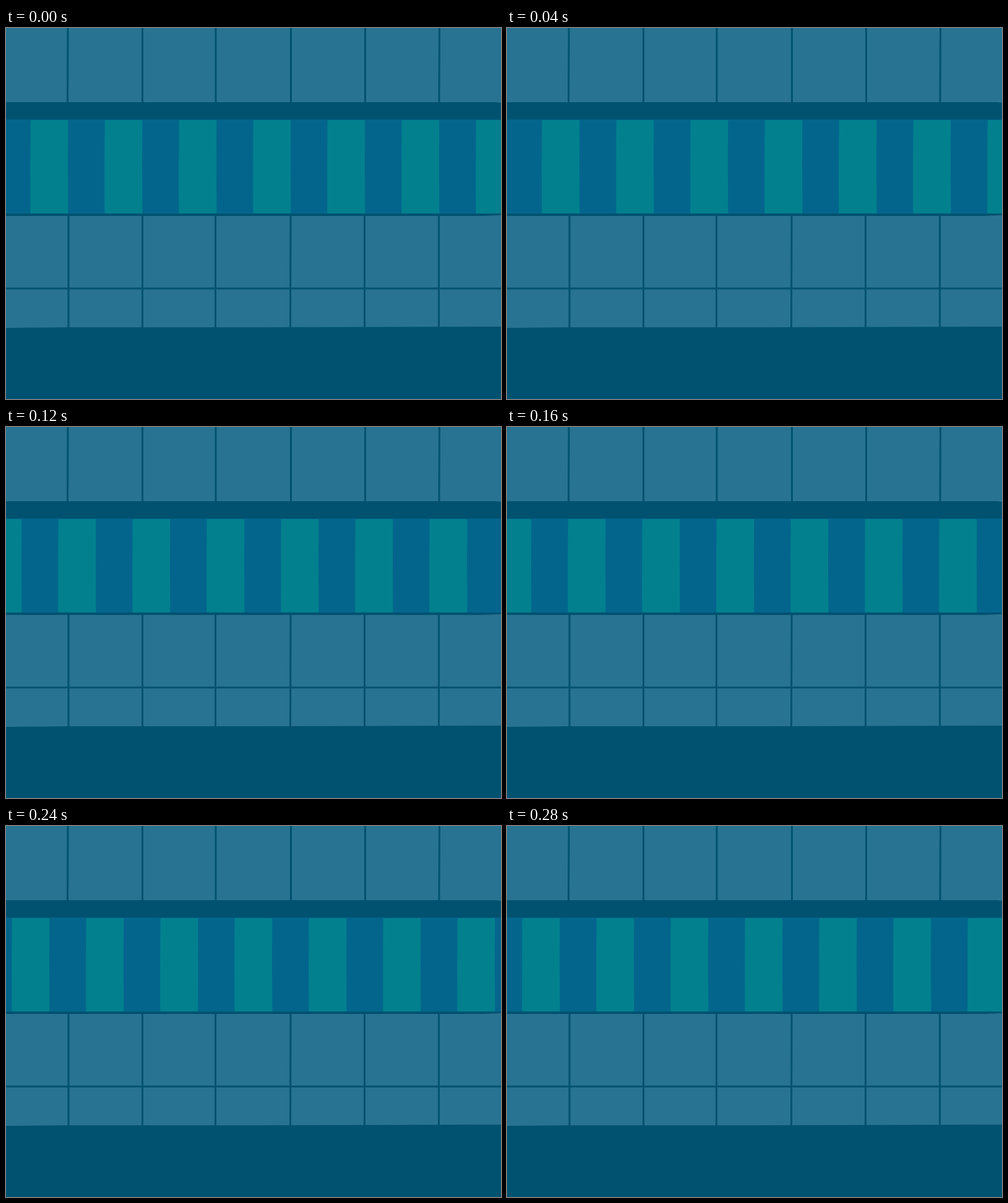
An HTML page that plays this animation: 800x600 px, repeating every 0.32 s.

```html
<!DOCTYPE html>
<html lang="en">
<head>
<meta charset="utf-8">
<title>Conveyor wall</title>
<style>
  html, body { margin: 0; width: 100%; height: 100%; overflow: hidden; background: #005270; }
  svg { display: block; width: 100%; height: 100%; }
  .seams { fill: none; stroke: #005270; stroke-width: 3; }
  .tile { fill: #287391; }
  .belt { fill: #03658c; }
  .stripes { fill: #02808e; animation: slide 320ms step-end infinite; }
  @keyframes slide {
    0%    { transform: translateX(0); }
    12.5% { transform: translateX(17px); }
    25%   { transform: translateX(31px); }
    37.5% { transform: translateX(45px); }
    50%   { transform: translateX(59px); }
    62.5% { transform: translateX(76px); }
    75%   { transform: translateX(90px); }
    87.5% { transform: translateX(105px); }
    100%  { transform: translateX(120px); }
  }
</style>
</head>
<body>
<svg viewBox="0 0 800 600">
  <defs>
    <path id="stripe" d="M1.3 149H60.6Q61.3 149 61.3 151L61 220L61.4 300H.3L.2 220L.6 150.5Q.6 149 1.3 149Z"/>
  </defs>

  <!-- Wall tiles -->
  <path class="tile" d="M0 0H800V121L792 120H0Z"/>
  <path class="tile" d="M0 304H772L800 302.7V483L400 484L100 484L0 485Z"/>
  <path class="seams" d="M100 0L99.5 120M220.5 0V120M339 0V120M460.5 0V120M580.5 0V120M700.5 0L700 120"/>
  <path class="seams" d="M101 303V485M220.5 303V485M338.5 303V485M460 303L459.5 485M579.5 303V485M699.5 303V485"/>
  <path class="seams" d="M0 421.3H800"/>

  <!-- Moving belt -->
  <path class="belt" d="M0 148H800V300H0Z"/>
  <g class="stripes">
    <use href="#stripe" x="-81"/>
    <use href="#stripe" x="39"/>
    <use href="#stripe" x="159"/>
    <use href="#stripe" x="279"/>
    <use href="#stripe" x="399"/>
    <use href="#stripe" x="519"/>
    <use href="#stripe" x="639"/>
    <use href="#stripe" x="759"/>
  </g>
</svg>
</body>
</html>
```
